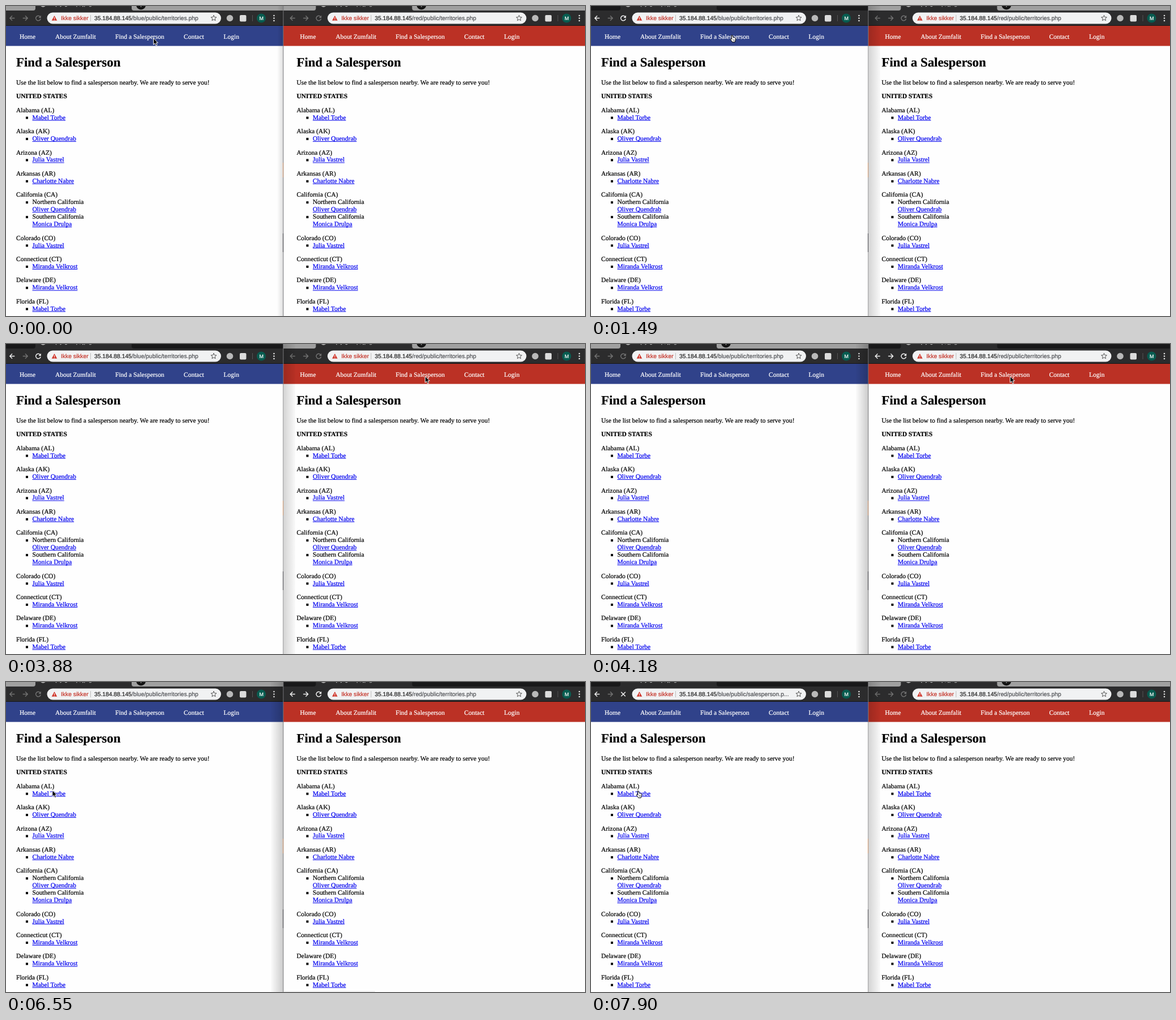
Recreate the animation shown at these times as an HTML page with a canvas. Size 1023x548 px, loop 8000 ms.

```html
<!DOCTYPE html>
<html lang="en">
<head>
<meta charset="utf-8">
<title>Find a Salesperson</title>
<style>
html, body { margin: 0; width: 100%; height: 100%; overflow: hidden; background: #fff; }
canvas { display: block; }
</style>
</head>
<body>
<canvas id="stage" width="1023" height="548"></canvas>
<script>
const c = document.getElementById('stage').getContext('2d');
const LOOP = 8000, EDGE = 490;
const SERIF = '"Liberation Serif", "Times New Roman", serif';
const SANS = '"Liberation Sans", Arial, sans-serif';
const BODY = '11.49px ' + SERIF, UI = '10.3px ' + SANS;
c.textRendering = 'geometricPrecision';

const ANN = 'Mabel Torbe', OLI = 'Oliver Quendrab', JUL = 'Julia Vastrel', MIR = 'Miranda Velkrost';
const territories = [
  ['Alabama (AL)', ANN], ['Alaska (AK)', OLI], ['Arizona (AZ)', JUL],
  ['Arkansas (AR)', 'Charlotte Nabre'],
  ['California (CA)', OLI, 'Northern California', 'Monica Drulpa', 'Southern California'],
  ['Colorado (CO)', JUL], ['Connecticut (CT)', MIR], ['Delaware (DE)', MIR], ['Florida (FL)', ANN]
];
const nav = [['Home', 24], ['About Zumfalit', 87], ['Find a Salesperson', 193], ['Contact', 314], ['Login', 384.5]];

// Pointer: start time, x, y, is hand
const pointer = [
  [0, 260.5, 57], [140, 247.5, 50], [1490, 246, 51, 1], [1640, 246, 50.5, 1],
  [2540, 310, 47], [2690, 480, 41], [2830, 670, 35], [2980, 768, 32],
  [3280, 790, 33], [3430, 814, 38], [3580, 798, 47], [3730, 760, 54], [3880, 740.5, 57],
  [4470, 738, 56.5, 1],
  [5510, 715, 64], [5660, 620, 92], [5810, 465, 134], [5950, 300, 170],
  [6100, 175, 192], [6250, 110, 198], [6400, 88, 195], [6550, 82, 191.5],
  [7450, 80, 192, 1]
];

// A hairline outline gives the text its slightly heavier weight
function text(s, x, y, font = BODY, color = '#000') {
  c.font = font;
  c.fillStyle = c.strokeStyle = color;
  c.lineWidth = .22;
  c.fillText(s, x, y);
  c.strokeText(s, x, y);
}
function rect(x, y, w, h, color) {
  c.fillStyle = color;
  c.fillRect(x, y, w, h);
}
function disc(x, y, r, color) {
  c.fillStyle = color;
  c.beginPath();
  c.arc(x, y, r, 0, 7);
  c.fill();
}
function round(x, y, w, h, r, color) {
  c.fillStyle = color;
  c.beginPath();
  c.roundRect(x, y, w, h, r);
  c.fill();
}
function stroke(path, color, width = 1.4) {
  c.strokeStyle = color;
  c.lineWidth = width;
  c.stroke(new Path2D(path));
}
function at(x, y, draw) {
  c.save();
  c.translate(x, y);
  draw();
  c.restore();
}
function fade(x0, x1, from, to) {
  const g = c.createLinearGradient(x0, 0, x1, 0);
  g.addColorStop(0, `rgba(0,0,0,${from})`);
  g.addColorStop(1, `rgba(0,0,0,${to})`);
  rect(x0, 0, x1 - x0, 548, g);
}

function tabs(active, loading) {
  const strip = active ? '#19191a' : '#a0a0a0';
  round(-20, -8, 72, 16, 4, strip);
  round(222, -8, 400, 16, 4, strip);
  if (!active) {
    disc(238.5, -2, 8.5, '#141414');
    stroke('M238.5 -4V2', '#999', 1.2);
  }
  if (!loading) disc(65.5, -3, 5, '#aaa');
  text('(by group, jpq)', 86, -1.2, UI, '#ccc');
}

function star(x, y) {
  c.beginPath();
  for (let i = 0; i < 10; i++) {
    const r = i % 2 ? 2.3 : 5.2, a = i * Math.PI / 5 - Math.PI / 2;
    c.lineTo(x + r * Math.cos(a), y + r * Math.sin(a));
  }
  c.closePath();
  c.strokeStyle = '#555';
  c.lineWidth = 1;
  c.stroke();
}

function toolbar(win) {
  const dim = '#737373', bright = '#f2f2f2';
  const main = win.active ? bright : dim;
  const arrow = 'M4.3 0H-4M0 -4.2L-4.2 0L0 4.2';
  at(11, 21.5, () => stroke(arrow, main));
  at(34, 21.5, () => {
    c.scale(-1, 1);
    stroke(arrow, win.forward ? main : dim);
  });
  at(57, 21.5, () => {
    if (win.loading) return stroke('M-3.8 -3.8L3.8 3.8M3.8 -3.8L-3.8 3.8', bright, 1.5);
    stroke('M3.2 -2.8A4.3 4.3 0 1 0 4.2 1', main);
    c.fillStyle = main;
    c.fill(new Path2D('M4.8 -5V-.6H.4Z'));
  });

  round(72.5, 11.5, 307.5 + win.extra, 20, 10, '#f1f2f3');
  c.fillStyle = '#d03a2f';
  c.fill(new Path2D('M85.5 17L90.3 25.8H80.7Z'));
  rect(85, 20, 1, 3, '#fff');
  rect(85, 24, 1, 1, '#fff');
  text('Ikke sikker', 97, 25, UI, '#c5372c');
  rect(149, 16, 1, 11, '#bbb');
  const host = '35.184.88.145';
  text(host, 156, 25, UI, '#222');
  text(win.path, 156 + c.measureText(host).width, 25, UI, '#505256');

  at(win.extra, 0, () => {
    star(367, 21.5);
    disc(395.5, 21.5, 5.8, '#b9b9b9');
    round(413, 16, 11.5, 11.5, 2, '#dcdcdc');
    rect(435, 16, 1, 11, '#555');
    disc(451, 21.5, 8, '#075c50');
    text('M', 447.5, 24.8, '9px ' + SANS, '#fff');
    for (const y of [17, 21.5, 26]) disc(473.5, y, 1.3, '#e4e4e4');
  });
}

function link(s, y) {
  text(s, 46.5, y, BODY, '#0000ee');
  rect(46.5, y + 1, c.measureText(s).width, 1, '#0000ee');
}
function bullet(y) {
  rect(35, y - 5, 4, 4, '#000');
}

function page() {
  for (const [label, x] of nav) text(label, x, 57.5, BODY, '#fff');
  text('Find a Salesperson', 18, 107.3, 'bold 22.9px ' + SERIF);
  text('Use the list below to find a salesperson nearby. We are ready to serve you!', 18, 138.7);
  text('UNITED STATES', 18, 163.2, 'bold ' + BODY);
  let y = 187.7;
  for (const [state, ...people] of territories) {
    text(state, 18, y);
    for (let i = 0; i < people.length; i += 2) {
      bullet(y += 12.95);
      if (people[i + 1]) {
        text(people[i + 1], 46.5, y);
        y += 12.95;
      }
      link(people[i], y);
    }
    y += 24.45;
  }
}

function drawWindow(win) {
  const { x, w } = win;
  c.save();
  c.beginPath();
  c.rect(x, 0, w, 548);
  c.clip();
  rect(x, 0, w, 548, '#fefefe');
  rect(x, 0, w, 35, '#2c2c2d');
  rect(x, 34, w, 1, '#161616');
  rect(x, 35, w, 35.6, win.color);
  c.translate(win.content, 0);
  tabs(win.active, win.loading);
  toolbar(win);
  page();
  c.restore();
}

function drawPointer(t) {
  const [, x, y, hand] = pointer.findLast(p => p[0] <= t);
  at(x, y, () => {
    c.lineJoin = 'round';
    const shape = new Path2D(hand
      ? 'M2 1Q3 -.2 4 1L5 4.5Q6 3.8 6.7 4.9Q7.7 4.3 8.3 5.5Q9.4 5.2 9.6 6.5L9 10.2L8.2 12.8H3.8L.5 8.2Q0 6.6 1.4 6.8L3 8Z'
      : 'M0 0V11.2L2.6 8.9L4.5 13L6.5 12.1L4.7 8.1H8Z');
    c.lineWidth = 1;
    c.fillStyle = hand ? '#fff' : '#000';
    c.strokeStyle = hand ? '#000' : '#fff';
    c.fill(shape);
    c.stroke(shape);
    if (hand) stroke('M5.2 8V10.7M7 8V10.7', '#000', .6);
  });
}

function draw(t) {
  const leftActive = t >= 440 && t < 4180 || t >= 7000;
  const rightActive = t >= 4180 && t < 7000;
  drawWindow({
    x: 0, w: EDGE, content: 0, extra: 0, color: '#30428a',
    active: leftActive, forward: false,
    loading: t >= 2090 && t < 2540 || t >= 7450,
    path: t >= 7900 ? '/blue/public/salesperson.p...' : '/blue/public/territories.php'
  });
  drawWindow({
    x: EDGE, w: 1023 - EDGE, content: 495.5, extra: 44, color: '#bb3125',
    active: rightActive, forward: true,
    loading: t >= 4620 && t < 5070,
    path: '/red/public/territories.php'
  });

  if (leftActive) fade(491, 511, .16, .02);
  else if (rightActive) fade(468, 490, .01, .2);
  else fade(479, 490, 0, .13);
  rect(489.4, 0, 1, 548, '#77777a');
  rect(489, 277, 1, 26, '#d8a077');
  rect(489, 402, 1, 33, '#55555a');
  if (rightActive) rect(491, 546, 161, 2, '#eeeeee');
  drawPointer(t);
}

function tick() {
  draw(performance.now() % LOOP);
  requestAnimationFrame(tick);
}
tick();
</script>
</body>
</html>
```
